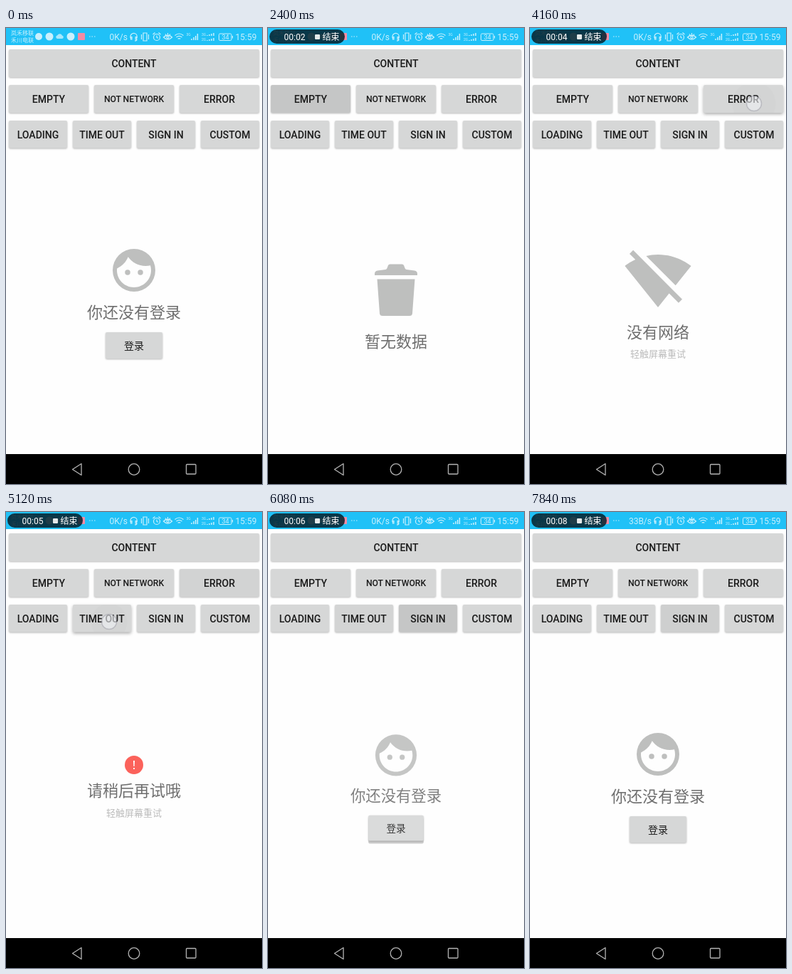
Write an HTML page that moves like this. It is 360 px wide and 640 px high and loops after 8000 ms.

```html
<!DOCTYPE html>
<html lang="zh-CN">
<head>
<meta charset="utf-8">
<title>State layout demo</title>
<style>
  html, body { margin: 0; width: 100%; height: 100%; overflow: hidden; background: #fff; }
  svg { display: block; width: 360px; height: 640px; }
  text { font-family: Roboto, "Noto Sans CJK SC", "Noto Sans CJK", sans-serif; text-anchor: middle; }
  .label { font-size: 14px; font-weight: 500; fill: #1b1b1b; }
  .title { font-size: 22px; fill: #6e6e6e; }
  .hint { font-size: 13px; fill: #bcbcbc; }
  .icon { fill: #bebfbe; }
  .face { fill: #d6d7d7; }
  .button { filter: drop-shadow(0 1px 1px rgba(0, 0, 0, .28)); }
  .button.down { filter: drop-shadow(0 2px 2px rgba(0, 0, 0, .32)); }
  .state { transform-origin: 180px 384px; }
  .status { fill: #c9f0fd; font-size: 12px; }
  .line { fill: none; stroke: #c9f0fd; stroke-width: 1.2; }
  .nav { fill: none; stroke: #b4b4b4; stroke-width: 1.3; stroke-linejoin: round; }
  .pill text { fill: #fff; font-size: 12px; }
</style>
</head>
<body>
<svg viewBox="0 0 360 640">
  <rect width="360" height="640" fill="#fefefe"/>

  <rect width="360" height="24" fill="#20c1f7"/>
  <g class="status">
    <text x="23" y="10" font-size="8">岚禾移联</text>
    <text x="23" y="20" font-size="8">禾川电联</text>
    <circle cx="46" cy="12" r="5"/>
    <circle cx="61" cy="12" r="5.5"/>
    <path d="M72 15a2.4 2.4 0 0 1 .3-4.700a3.600 3.600 0 0 1 6.600 .2a2.300 2.300 0 0 1 .2 4.500z" opacity=".8"/>
    <circle cx="91" cy="12" r="5.500"/>
    <rect x="101" y="7" width="10" height="10" rx="1" fill="#f48ba4"/>
    <path d="M117 12h1.500M120.500 12h1.500M124 12h1.500" class="line"/>
    <text id="speed" x="171" y="17" style="text-anchor:end">0K/s</text>
    <text x="337.500" y="17">15:59</text>
    <text x="308.500" y="16" font-size="9">34</text>
    <text x="256.500" y="11" font-size="5">3G</text>
    <text x="278" y="11" font-size="5">3G</text>
    <text x="278" y="18" font-size="5">2G</text>
  </g>
  <g class="line">
    <path d="M175 14v-2a4.600 4.600 0 0 1 9.200 0v2M175.500 12.500v3.500h1.500v-3.500zM182.200 12.500v3.500h1.500v-3.500zM184 16q0 2-3 2"/>
    <path d="M193 7h5v11h-5zM190.500 9v7M200.500 9v7"/>
    <circle cx="212" cy="13" r="4.500"/>
    <path d="M212 10.500v2.700l2 1M206.500 9l3-2.500M217.500 9l-3-2.500"/>
    <path d="M221.500 13q6-6 12 0q-6 6-12 0zM224 8.500l1 1.500M227.500 7v2M231 8.500l-1 1.500"/>
    <circle cx="227.500" cy="13" r="1.600"/>
    <path d="M237.500 10.500q6-5 12 0M239.500 13q4-3.300 8 0M241.700 15.300q1.800-1.500 3.600 0"/>
    <path d="M261 17v-2M264 17v-4M266.700 17v-6M269.400 17v-9" stroke-width="1.500"/>
    <path d="M283 11v-1M286 11v-2M289 11v-3M292 11v-4M283 18v-1M286 18v-2M289 18v-3M292 18v-4" stroke-width="1.500"/>
    <rect x="299.500" y="8" width="17.500" height="9.500" rx="1.500" stroke-width="1"/>
    <path d="M318.500 11v3.500"/>
  </g>

  <g class="pill" id="pill">
    <rect x="2" y="2" width="106" height="20" rx="10" fill="#06232e" opacity=".87"/>
    <text id="clock" x="37.500" y="17">00:00</text>
    <rect x="66" y="9" width="7" height="7" rx="1" fill="#e4e9ea"/>
    <text x="88.500" y="17">结束</text>
  </g>

  <g id="buttons"></g>

  <g class="state" id="signin">
    <path class="icon" transform="translate(144 304) scale(3)" fill-rule="evenodd" d="M12 2a10 10 0 1 0 0 20a10 10 0 1 0 0-20zm0 18c-4.410 0-8-3.590-8-8 0-.29.02-.58.05-.86 2.360-1.050 4.230-2.980 5.210-5.370C11.070 8.330 14.050 10 17.420 10c.78 0 1.530-.09 2.250-.26.21.71.33 1.470.33 2.260 0 4.410-3.590 8-8 8z"/>
    <circle class="icon" cx="171" cy="343" r="3.750"/>
    <circle class="icon" cx="189" cy="343" r="3.750"/>
    <text class="title" x="180" y="407">你还没有登录</text>
    <rect id="lift" x="140" y="431" width="80" height="37" rx="2" fill="#cacaca"/>
    <g class="button"><rect class="face" x="140" y="427" width="80" height="37" rx="2"/></g>
    <text class="label" x="180" y="451">登录</text>
  </g>

  <g class="state" id="empty">
    <path class="icon" d="M150 347v-2q0-4 4-4.500l11.500-1.500q1.500-.3 2-2l1.500-4q.7-1.500 2.500-1.500h17q1.800 0 2.500 1.500l1.500 4q.5 1.700 2 2l11.500 1.500q4 .5 4 4.500v2zM153.500 352.500h53l-3.500 48q-.3 3.500-4 3.500h-38q-3.700 0-4-3.500z"/>
    <text class="title" x="180" y="448">暂无数据</text>
  </g>

  <g class="state" id="offline">
    <path class="icon" transform="translate(132 306) scale(4)" d="M23.640 7c-.45-.34-4.930-4-11.640-4-1.500 0-2.890.19-4.150.48L18.180 13.800 23.640 7zm-6.600 8.220L3.270 1.440 2 2.720l2.050 2.060C1.910 5.760.59 6.820.36 7L12 21.500l3.910-4.870 3.320 3.320 1.270-1.270z"/>
    <text class="title" x="180" y="435">没有网络</text>
    <text class="hint" x="180" y="462">轻触屏幕重试</text>
  </g>

  <g class="state" id="error">
    <circle cx="180" cy="355" r="13" fill="#fb625b"/>
    <path d="M179 349h2l-.4 8h-1.200zM179.100 359h1.800v2h-1.800z" fill="#fff"/>
    <text class="title" x="180" y="399">请稍后再试哦</text>
    <text class="hint" x="180" y="427">轻触屏幕重试</text>
  </g>

  <rect y="598" width="360" height="42" fill="#000"/>
  <g class="nav">
    <path d="M93.500 619.500l12.500-8v16z"/>
    <circle cx="180" cy="619.500" r="7.800"/>
    <rect x="253.500" y="612.500" width="13.500" height="13.500" rx="1"/>
  </g>

  <circle id="finger" r="10.500" fill="#f0f1f5" fill-opacity=".6" stroke="#8d8d98" stroke-opacity=".4" stroke-width="1.500"/>
</svg>

<script>
const LOOP = 8000, STEP = 160, SHOW = 300;
const $ = id => document.getElementById(id);
const clamp = v => Math.max(0, Math.min(1, v));

const rows = [
  { y: 30, h: 39, names: ['CONTENT'] },
  { y: 80, h: 39, names: ['EMPTY', 'NOT NETWORK', 'ERROR'] },
  { y: 130, h: 38.5, names: ['LOADING', 'TIME OUT', 'SIGN IN', 'CUSTOM'] }
];

const taps = [
  { name: 'EMPTY', x: 62, y: 104, down: 1740, up: 2000, state: 'empty' },
  { name: 'NOT NETWORK', x: 184, y: 104, down: 3020, up: 3280, state: 'offline' },
  { name: 'ERROR', x: 315, y: 106, down: 4110, up: 4400, state: 'error' },
  { name: 'TIME OUT', x: 145, y: 154, down: 5070, up: 5320, state: 'error' },
  { name: 'SIGN IN', x: 226, y: 154, down: 5640, up: 5804, state: 'signin' },
  { name: 'CUSTOM', x: 316, y: 154, down: 6390, up: 6560, state: 'signin' },
  { name: 'SIGN IN', x: 226, y: 154, down: 7000, up: 7200, state: 'signin' }
];

// Moments at which the recording clock gains a second.
const ticks = [800, 1280, 2560, 3520, 4480, 5600, 6560, 7520];

const buttons = {};
let markup = '';
for (const { y, h, names } of rows) {
  const w = (360 - 8 * names.length) / names.length;
  names.forEach((name, i) => {
    const x = 4 + i * (w + 8), id = name.replace(' ', '-');
    const size = name === 'NOT NETWORK' ? 12.2 : 14;
    const box = `x="${x}" y="${y}" width="${w}" height="${h}" rx="2"`;
    buttons[name] = { id, w };
    markup += `<clipPath id="clip-${id}"><rect ${box}/></clipPath>
      <g class="button" id="${id}"><rect class="face" ${box}/></g>
      <g clip-path="url(#clip-${id})"><circle id="ripple-${id}" r="0"/></g>
      <text class="label" x="${x + w / 2}" y="${y + 20 + size * .355}" style="font-size:${size}px">${name}</text>`;
  });
}
$('buttons').innerHTML = markup;

const states = ['signin', 'empty', 'offline', 'error'];

function paintState(id, alpha, scale) {
  const style = $(id).style;
  style.opacity = alpha;
  style.transform = `scale(${scale})`;
}

function drawStates(t) {
  let current = 'signin', previous = 'signin', changed = -LOOP;
  for (const tap of taps) {
    const at = tap.up + 80;
    if (t < at) break;
    if (tap.state === current && tap.name !== 'TIME OUT') continue;
    previous = current;
    current = tap.state;
    changed = at;
  }
  const shown = 1 - (1 - clamp((t - changed) / SHOW)) ** 2;
  for (const id of states) paintState(id, 0, 1);
  if (previous !== current) paintState(previous, 1 - clamp((t - changed) / 150), 1);
  paintState(current, shown, .75 + .25 * shown);
  $('lift').style.opacity = shown < 1 ? 1 : 0;
}

function drawTaps(t) {
  for (const { id } of Object.values(buttons)) {
    $(id).classList.remove('down');
    $('ripple-' + id).style.opacity = 0;
  }
  $('finger').style.opacity = 0;
  for (const tap of taps) {
    if (t < tap.down || t > tap.up + 820) continue;
    const { id, w } = buttons[tap.name];
    const ripple = $('ripple-' + id);
    const grow = clamp((t - tap.down) / 300);
    ripple.setAttribute('cx', tap.x);
    ripple.setAttribute('cy', tap.y);
    ripple.setAttribute('r', 12 + w * grow);
    ripple.style.opacity = .08 * grow * (1 - clamp((t - tap.up - 420) / 400));
    if (t <= tap.up) {
      $(id).classList.add('down');
      $('finger').setAttribute('cx', tap.x);
      $('finger').setAttribute('cy', tap.y);
      $('finger').style.opacity = 1;
    }
  }
}

function draw(now) {
  const t = Math.floor((now % LOOP) / STEP) * STEP;
  $('pill').style.opacity = clamp(t / 320);
  $('clock').textContent = '00:0' + ticks.filter(tick => t >= tick).length;
  $('speed').textContent = t < 7360 ? '0K/s' : '33B/s';
  drawTaps(t);
  drawStates(t);
}

const start = performance.now();
function frame() {
  draw(performance.now() - start);
  requestAnimationFrame(frame);
}
frame();
</script>
</body>
</html>
```
